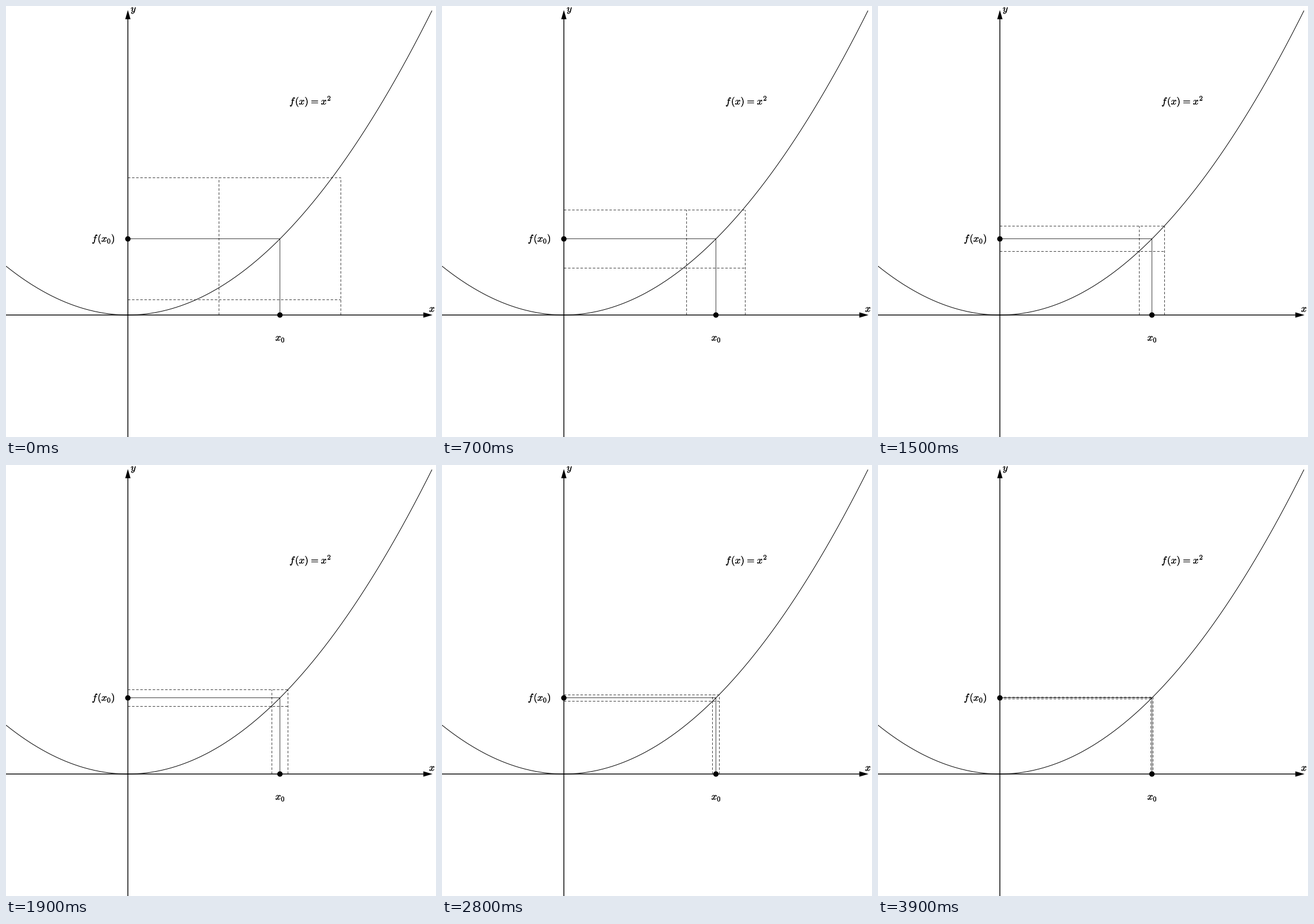
These frames come from a looping animation (748x749 px, 4 s). A matplotlib script:

```python
import numpy as np
import matplotlib.pyplot as plt
from matplotlib.animation import FuncAnimation
from matplotlib.patches import Circle, Polygon
from matplotlib.patheffects import withStroke

W, H, DPI = 748, 749, 64
PT = 72 / DPI                 # points per pixel
OX, OY = 212, 537             # origin
UNIT = 529                    # length of each positive half axis
X0 = UNIT / 2
FRAMES, INTERVAL = 40, 100
START, DECAY = 0.2 * UNIT, 0.9
THIN, THICK = 0.75, 1.45      # line widths in pixels

plt.rcParams["mathtext.fontset"] = "cm"

fig = plt.figure(figsize=(W / DPI, H / DPI), dpi=DPI, facecolor="white")
ax = fig.add_axes([0, 0, 1, 1])
ax.set_xlim(0, W)
ax.set_ylim(H, 0)
ax.axis("off")


def f(x):
    return x * x / UNIT


def pix(v):
    """Centre of the pixel that holds v."""
    return np.floor(v) + 0.5


def line(xs, ys, width=THIN, **style):
    return ax.plot(xs, ys, color="black", lw=width * PT,
                   solid_capstyle="butt", dash_capstyle="butt",
                   snap=False, **style)[0]


def dashed():
    dash = (0, (4.3 / THIN, 2.9 / THIN))
    return line([], [], linestyle=dash, zorder=1)


def arrow(points):
    ax.add_patch(Polygon(points, closed=True, facecolor="black",
                         edgecolor="none", zorder=4))


def dot(x, y):
    ax.add_patch(Circle((x, y), 4.7, facecolor="black", edgecolor="none",
                        zorder=5))


def label(x, y, text):
    ax.text(x, y, text, size=17.2 * PT, color="black",
            ha="left", va="baseline",
            path_effects=[withStroke(linewidth=0.2 * PT, foreground="black")])


# Axes
line([0, OX + UNIT - 6], [OY, OY], THICK, zorder=3)
line([OX, OX], [H, OY - UNIT + 6], THICK, zorder=3)
tip_x, tip_y = OX + UNIT + 1, OY - UNIT - 1
arrow([(tip_x, OY), (tip_x - 16, OY - 4.6), (tip_x - 16, OY + 4.6)])
arrow([(OX, tip_y), (OX - 4.6, tip_y + 16), (OX + 4.6, tip_y + 16)])

# Parabola and its marked point
u = np.linspace(-OX, UNIT, 500)
line(OX + u, OY - f(u), 1, zorder=2)
px, py = OX + X0, OY - f(X0)
line([OX, pix(px), pix(px)], [pix(py), pix(py), OY], zorder=2)
dot(px, OY)
dot(OX, py)

label(493, 171, r"$f\hspace{0.1}(x)\hspace{0.08}=\hspace{0.08}x^2$")
label(149.3, 409.5, r"$f\hspace{0.1}(x_0)$")
label(468.5, 581.5, r"$x_0$")
label(736, 531.3, r"$x$")
label(217, 10, r"$y$")

left, right, top, bottom = (dashed() for _ in range(4))


def update(i):
    eps = START * DECAY ** i
    x_hi, y_hi = pix(px + eps), pix(py - eps)
    for item, x in ((left, pix(px - eps)), (right, x_hi)):
        item.set_data([x, x], [OY, y_hi])
    for item, y in ((top, y_hi), (bottom, pix(py + eps))):
        item.set_data([OX, x_hi], [y, y])
    return left, right, top, bottom


anim = FuncAnimation(fig, update, frames=FRAMES, interval=INTERVAL,
                     init_func=lambda: update(0), repeat=True, repeat_delay=0)
plt.show()
```
